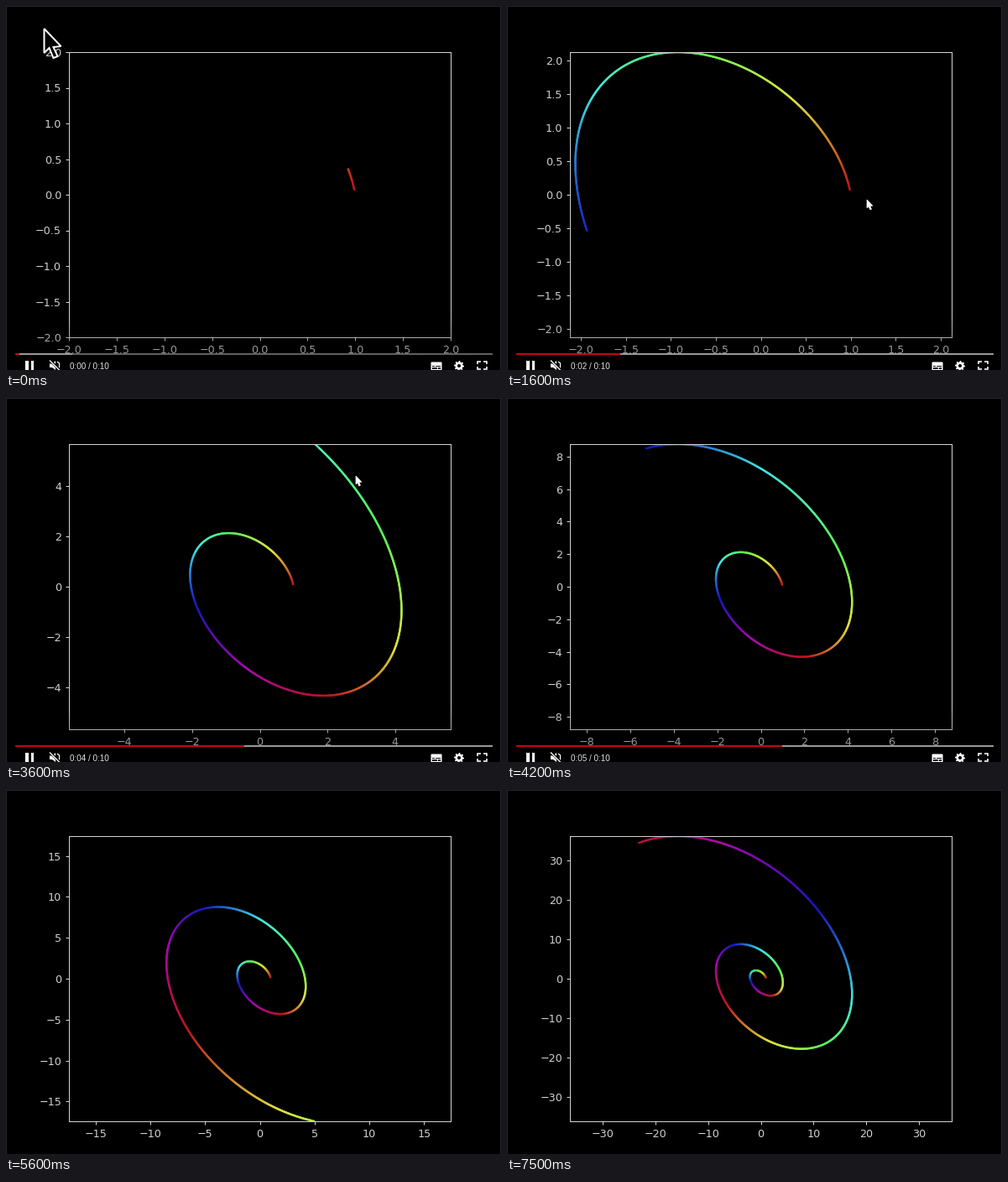
Write a matplotlib script that moves like this. It is 590 px wide and 434 px high and loops after 7600 ms.

```python
import numpy as np
import matplotlib.pyplot as plt
from matplotlib.animation import FuncAnimation
from matplotlib.collections import LineCollection
from matplotlib.colors import hsv_to_rgb
from matplotlib.patches import Circle, FancyBboxPatch, Polygon, Rectangle

W, H, DPI = 590, 434, 100
FRAMES, STEP_MS = 76, 100
PX = 72 / DPI
SCALE = 0.919  # default 640x480 figure shown smaller
INK = "#d2d2d2"

# Linear system solved in closed form, angle in radians
GROWTH, SKEW, TALL = 0.2258, -0.405, 1.4515
START, SPEED = 0.245, 0.1922
HUE_TURN = 4.92

fig = plt.figure(figsize=(W / DPI, H / DPI), dpi=DPI, facecolor="black")


def ramp(i, start, end):
    return np.clip((i - start) / (end - start), 0, 1)


def spiral(a):
    r = np.exp(GROWTH * a)
    return r * (np.cos(a) + SKEW * np.sin(a)), r * TALL * np.sin(a)


def rainbow(a):
    """Hue wheel that is pale and bright at green, deep at purple."""
    hue = (a / HUE_TURN - 0.02) % 1
    lift = 0.5 + 0.5 * np.cos(2 * np.pi * (hue - 1 / 3))
    return hsv_to_rgb(np.c_[hue, 0.95 - 0.3 * lift, 0.67 + 0.28 * lift])


# Plot
ax = fig.add_axes([75 / W, 1 - 395 / H, 455 / W, 340 / H], facecolor="black")
ax.tick_params(colors=INK, labelsize=10 * SCALE, length=3.5 * SCALE,
               width=0.8 * SCALE, pad=3.5 * SCALE)
for spine in ax.spines.values():
    spine.set(color=INK, linewidth=0.8 * SCALE)
curve = ax.add_collection(LineCollection([], linewidths=1.7))

# Overlay in pixels, y pointing down
ui = fig.add_axes([0, 0, 1, 1])
ui.axis("off")
controls = []


def add(patch, control=True):
    ui.add_patch(patch)
    if control:
        controls.append(patch)
    return patch


def box(x, y, w, h, color="white", control=True):
    return add(Rectangle((x, y), w, h, fc=color, ec="none"), control)


def stroke(xs, ys, color="white", width=1.5):
    line, = ui.plot(xs, ys, color=color, lw=width * PX, solid_capstyle="butt",
                    solid_joinstyle="miter")
    controls.append(line)


shade = np.zeros((64, 1, 4))
shade[:, 0, 3] = np.linspace(0, 0.45, 64)
controls.append(ui.imshow(shade, extent=(0, W, H, 370), aspect="auto"))

for edge in ((0, 0, W, 1), (0, 0, 1, H), (W - 1, 0, 1, H)):
    box(*edge, color="#242424", control=False)

# Progress bar
BAR_X, BAR_Y, BAR_W, BAR_H = 11, 414, 569, 2
box(BAR_X, BAR_Y, BAR_W, BAR_H, "#606060")
loaded = box(BAR_X, BAR_Y, 0, BAR_H, "#989898")
played = box(BAR_X, BAR_Y, 0, BAR_H, "#c80014")

# Pause, muted speaker, clock
for x in (23, 29.5):
    box(x, 423, 3.5, 11)
add(Polygon([(52, 426.5), (55, 426.5), (59, 423), (59, 434), (55, 431), (52, 431)],
            fc="white", ec="none"))
stroke([61, 63.5, 63.5, 61], [424, 426, 431, 433], width=1.2)
stroke([52, 65], [422, 435], "black", 3)
stroke([52, 65], [422.5, 435.5], width=1.3)
clock = ui.text(76, 429.3, "", color="#e6e6e6", fontsize=9.9 * PX,
                family="Liberation Sans", va="center_baseline")
controls.append(clock)

# Captions, settings, full screen
add(FancyBboxPatch((507, 425), 12, 9, boxstyle="round,pad=0.5,rounding_size=1",
                   fc="white", ec="none"))
for x, y, w in ((508, 428.5, 3), (512, 428.5, 6), (508, 431.3, 6), (515, 431.3, 3)):
    box(x, y, w, 1.2, "black")
turn = np.arange(32) * 2 * np.pi / 32
tooth = np.where(np.arange(32) % 4 < 2, 6, 4.5)
add(Polygon(np.c_[540 + tooth * np.cos(turn), 429 + tooth * np.sin(turn)],
            fc="white", ec="none"))
add(Circle((540, 429), 2, fc="black", ec="none"))
for sx in (-1, 1):
    for sy in (-1, 1):
        x, y = 567.3 + 5.2 * sx, 428.5 + 4.8 * sy
        stroke([x, x, x - 3.5 * sx], [y - 3 * sy, y, y], width=1.6)

# Pointer: large at rest, then small and moving through a few stops
ARROW = np.array([(0, 0), (0, 29), (6, 23), (11, 35), (16, 33), (11, 22), (20, 21)])
STOPS = np.array([(8, 45.5, 27), (10, 60, 20), (16, 429, 231), (25, 220, 148),
                  (36, 417, 93), (40, 440, 440)])
pointer = add(Polygon(ARROW, ec="white", joinstyle="miter"), control=False)

ui.set(xlim=(0, W), ylim=(H, 0))


def draw_curve(i):
    head = START + SPEED * i
    a = np.linspace(0.04, head, int(40 * head) + 12)
    pts = np.column_stack(spiral(a))
    # Three-point pieces overlap so no seams show
    curve.set_segments(np.stack([pts[:-2], pts[1:-1], pts[2:]], axis=1))
    curve.set_color(rainbow(a[1:-1]))
    lim = max(2, np.abs(pts).max())
    ax.set(xlim=(-lim, lim), ylim=(-lim, lim))


def draw_player(i):
    done = min(1, 0.0088 + 0.01307 * i)
    played.set_width(BAR_W * done)
    loaded.set_width(BAR_W * (0.12 + 0.88 * ramp(i, 0, 3)))
    clock.set_text(f"0:{int(10.1 * done):02d} / 0:10")
    for c in controls:
        c.set_alpha(1 - ramp(i, 52, 55))


def draw_pointer(i):
    shrink = ramp(i, 9, 13)
    size = 1 - 0.66 * shrink
    t, x, y = STOPS.T
    pointer.set_xy(ARROW * size + (np.interp(i, t, x), np.interp(i, t, y)))
    pointer.set(fc=str(shrink), lw=2 * PX * size, visible=i < t[-1])


def draw(i):
    draw_curve(i)
    draw_player(i)
    draw_pointer(i)
    return []


anim = FuncAnimation(fig, draw, frames=FRAMES, interval=STEP_MS,
                     repeat=True, repeat_delay=0, blit=False)
plt.show()
```
